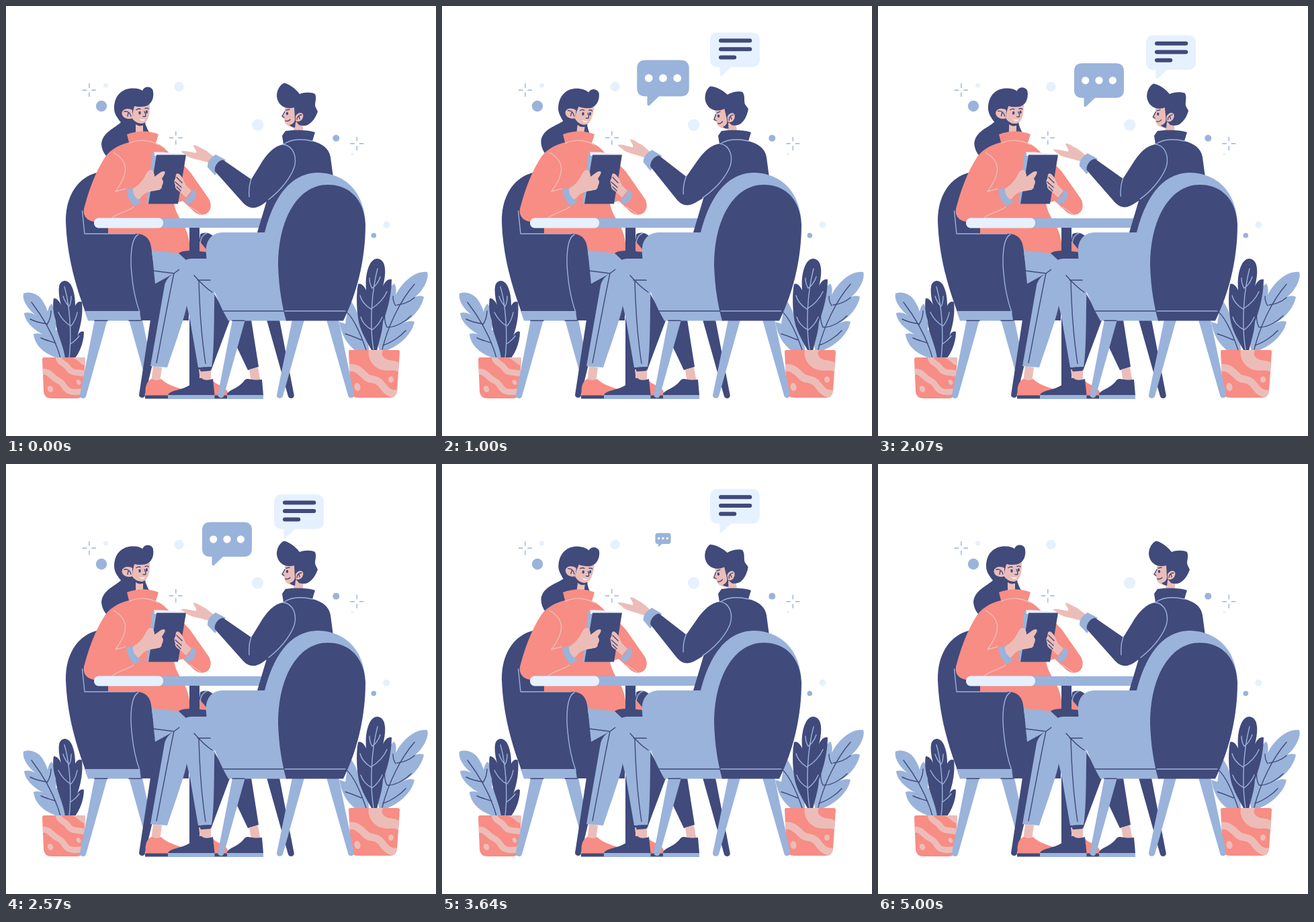
Animation, 640 px wide and 640 px high, one loop 5070 ms. Source, as an HTML page:

```html
<!DOCTYPE html>
<html lang="en">
<head>
<meta charset="utf-8">
<title>Table talk</title>
<style>
html, body { margin: 0; width: 100%; height: 100%; overflow: hidden; background: #fff; }
svg { display: block; width: 100vw; height: 100vh; }
.n { fill: #404a7b; }
.b { fill: #9ab3db; }
.l { fill: #e6f1ff; }
.c { fill: #f78d85; }
.s { fill: #ecbdb8; }
.w { fill: #fff; }
.ln, .lb, .ls { fill: none; stroke-width: 1.4; stroke-linecap: round; stroke-linejoin: round; }
.ln { stroke: #404a7b; }
.lb { stroke: #9ab3db; }
.ls { stroke: #ecbdb8; }
</style>
</head>
<body>
<svg viewBox="0 0 640 640">
<defs>
  <clipPath id="potL"><path d="M57 523H116Q118 523 118 526L114 577Q113 584 106 584H68Q57 584 56 574L54 526Q54 523 57 523Z"/></clipPath>
  <clipPath id="potR"><path d="M512 512H583Q586 512 586 515L582 573Q581 583 571 583H524Q514 583 513 574L510 515Q510 512 512 512Z"/></clipPath>
  <path id="spark" class="lb" d="M-9.500 0H-4M4 0H9.500M0 -9.500V-4M0 4V9.500"/>
  <path id="bubble" d="M-25 -32.500H25Q37 -32.500 37 -20.500V7Q37 19 25 19H-6L-19 31.500Q-22 33.500 -22.500 30V19H-25Q-37 19 -37 7V-20.500Q-37 -32.500 -25 -32.500Z"/>
</defs>

<!-- floating dots -->
<g class="b"><circle cx="142" cy="149" r="8.200"/><circle cx="491.300" cy="196.700" r="5"/><circle cx="547.300" cy="341.500" r="3.800"/></g>
<g class="l"><circle cx="148.500" cy="118" r="3.600"/><circle cx="257.500" cy="120" r="7.200"/><circle cx="374.500" cy="177" r="8.700"/><circle cx="566.300" cy="325.600" r="5"/><circle cx="515.300" cy="220.500" r="2"/></g>
<use href="#spark" x="123.800" y="125.300"/><use href="#spark" x="252.800" y="196.300"/><use href="#spark" x="522.300" y="204.700"/>

<!-- left plant -->
<path class="b" d="M80 525C54 518 42 502 41 488C47 486 54 488 59 491C42 483 28 470 27 457C33 455 40 457 45 461C31 450 24 437 26 428C34 424 48 428 54 438C57 443 60 448 62 455C63 449 65 445 68 443C74 452 76 466 74 483C77 480 80 480 82 481C90 492 90 510 88 525Z"/>
<path class="ln" d="M38 441C54 462 72 490 81 524M61 474C65 468 67 461 67 454M36 466C44 470 53 472 60 473M52 494C60 498 68 499 74 502"/>
<path class="n" d="M88 525C86 505 74 485 74 468C69 455 70 440 71 435C76 435 80 440 82 445C79 435 78 424 79 418C80 409 89 405 96 414C102 424 103 436 103 446C106 440 110 439 113 441C115 458 111 478 106 491C109 485 113 483 116 485C116 500 110 515 102 525Z"/>
<path class="lb" d="M87 418C95 445 98 490 94 524M93 446C90 443 87 438 85 432M94 447C97 442 97 437 97 432M96 476C89 472 82 464 78 456M97 476C102 470 105 462 106 456M96 503C101 500 106 495 109 491"/>
<g clip-path="url(#potL)">
  <rect class="c" x="50" y="520" width="72" height="66"/>
  <path class="ls" style="stroke-width:9" d="M52 545C64 541 68 553 77 557C88 562 86 570 94 573C102 577 110 572 120 575M78 520C78 532 86 530 92 538C98 548 106 544 120 548"/>
  <ellipse class="s" cx="66" cy="570" rx="4" ry="5" transform="rotate(-25 66 570)"/><ellipse class="s" cx="108" cy="560" rx="3" ry="4" transform="rotate(-30 108 560)"/>
  <path class="s" d="M96 522H120V535C112 536 108 526 96 522Z"/>
</g>

<!-- right plant -->
<path class="b" d="M511 436C520 447 525 460 527 475C537 486 540 500 540 513H520C506 502 499 488 496 470L505 473Z"/>
<path class="ln" d="M506 455C516 462 528 488 536 512M505 488C515 491 522 494 529 497"/>
<path class="b" d="M556 514C552 500 551 485 553 475C552 460 557 445 564 434C566 425 572 417 578 413C581 418 581 424 580 430C590 410 610 393 627 396C630 404 623 422 609 433C614 431 619 431 622 433C618 452 602 467 589 473C597 469 603 468 608 470C604 490 583 508 562 514Z"/>
<path class="ln" d="M608 414C587 438 569 475 560 511M580 446C577 442 576 437 576 432M582 445C592 444 602 439 608 434M567 478C564 472 563 463 564 456M568 478C580 479 596 468 603 461M561 505C574 501 588 491 595 483"/>
<path class="n" d="M545 514C537 499 526 482 524 464C521 445 522 424 524 414C529 412 533 417 536 423C534 400 540 376 553 376C568 378 565 402 561 417C565 408 570 406 574 407C574 430 567 455 561 470C560 488 554 502 552 514Z"/>
<path class="lb" d="M553 391C544 425 541 475 547 511M545 420C542 415 541 410 541 405M545 420C551 416 555 409 557 403M543 451C535 446 529 439 527 431M543 451C555 444 563 434 567 425M545 482C536 478 530 470 528 463M545 482C552 477 557 470 560 463"/>
<g clip-path="url(#potR)">
  <rect class="c" x="506" y="508" width="84" height="80"/>
  <path class="ls" style="stroke-width:11" d="M506 541C518 533 528 544 536 552C543 558 549 553 557 561C564 569 568 579 584 577"/>
  <path class="s" d="M540 511H562C556 519 562 525 570 527C577 528 581 528 588 533V546C578 540 571 544 562 542C549 540 537 527 540 511Z"/>
  <ellipse class="s" cx="523" cy="567" rx="4.500" ry="6" transform="rotate(-15 523 567)"/><ellipse class="s" cx="573" cy="556" rx="4" ry="4.500"/>
</g>

<!-- left chair, rear part -->
<path class="b" d="M132 467H151L119 581A4.700 4.700 0 0 1 110 578.500ZM183 467H203L213 515L205 546Z"/>
<path class="n" d="M215 467H234L206.500 581A4.700 4.700 0 0 1 198 579Z"/>
<path class="n" d="M146 246C108 250 88 282 89 322C91 372 103 415 118 455H200L220 330Z"/>

<!-- woman head -->
<g id="woman">
  <path class="n" d="M163 140C160 158 166 168 171 173C162 182 143 188 142 206C143 218 150 226 160 232L200 228L218 195C211 186 208 178 205 168Z"/>
  <path class="s" d="M193 170H204V194H193Z"/>
  <path class="n" d="M190 169C195 175 203 176 208 173C206 179 198 180 193 176Z"/>
  <path class="s" d="M184 146H214C214 158 213 172 204 174.500C196 176 190 171 187 166Z"/>
  <path class="n" d="M161 152C161 132 174 122 190 122.500C196 122.600 200 124 203 126C206 119 215 119 218.500 125C221.500 137 216 148 206 149.500C200 150.300 195 150 191 149C190 154 188 158 188 167L172 172C165 167 161 160 161 152Z"/>
  <path class="s" d="M188 155C184 152 174 152 172.500 159C172 166 181 170 188 167Z"/>
  <path class="ln" d="M176 157C181 156 185 159 186 164M182 159L181 164M194 154.500Q197 152 200 153.500M207 152.500Q210 151 212 153M206 157Q209 163 207.500 164.500L204 164.500"/>
  <ellipse class="n" cx="199" cy="159" rx="1.700" ry="2.500"/><ellipse class="n" cx="209.300" cy="157.500" rx="1.600" ry="2.500"/>
  <path class="w" d="M198.500 168.300Q203 170 207 168.200Q205.500 171.200 202.500 170.800Q200 170.300 198.500 168.300Z"/>
</g>

<!-- woman torso -->
<path class="c" d="M180 191C196 185 213 185 227 191L223 204C229 206 236 211 242 218C260 232 268 240 274 247L302 287C307 296 305 307 296 310C290 312 285 310 280 306L263 290L250 294C252 304 256 312 261 320C268 332 274 343 274 368H215L200 345H152V319C146 321 138 321 131 321C118 319 113 309 117 298C125 268 135 245 145 229C152 216 166 207 183 203Z"/>
<path class="ls" d="M184 204C198 198 214 199 227 207M160 218C184 232 182 250 163 276L178 272M158 315C169 307 183 305 190 299M274 299C279 302 285 306 290 310"/>

<!-- notebook and hands -->
<path class="b" d="M218 219L225 220L215 294H209Z"/>
<path class="w" d="M221 217.500L268 220V223H221Z"/>
<path class="l" d="M220 217.500H234L268 221H221Z"/>
<path class="n" d="M224 221.500H268L256 294.500H212Z"/>
<path class="s" d="M187 273C200 266 205 257 208 251C211 244 217 242 219 246C221 250 221 251 221 254C226 251 230 246 235 246C239 247 235 252 232 257L234 261C234 264 233 266 232 268C232 272 229 274 226 274C219 276 207 275 200 286L194 290Z"/>
<path class="b" d="M179 273L189 271C188 281 194 288 203 291L191 298C184 292 180 282 179 273Z"/>
<path class="s" d="M253 251C255 247 259 250 262 255C265 260 266 264 268 267L276 275L268 285L258 276C253 273 251 270 252 267C250 263 250 259 252 257Z"/>
<path class="ln" d="M254 255L262 263M252 262L261 270M254 269L260 275"/>
<path class="b" d="M276 272L283 278C283 287 277 294 269 295L266 288C272 285 276 280 276 272Z"/>

<!-- left chair, front part -->
<path class="n" d="M113 304L117 339H195C211 340 216 350 217 366L224 410H272V468H201L118 455L100 390Z"/>
<path class="b" d="M117 454H199L201 468.500H122Z"/>
<path class="lb" d="M113.500 305L117 339H192M197 340C185 346 185 378 187 398C189 421 194 442 199 456"/>
<path class="ln" d="M132 468.300H151M183 468.300H201"/>

<!-- table -->
<path class="n" d="M273 328H288V584H273Z"/>
<path class="c" d="M288 346H300V370H288Z"/>
<path class="n" d="M289 340C296 335 306 338 311 346L298 362L288 350Z"/>
<path class="lb" d="M289 353C290 345 293 340 299 338"/>
<path class="b" d="M225 316H384V330H225Z"/>
<rect class="l" x="131" y="315.500" width="103" height="15" rx="7"/>

<!-- woman legs -->
<path class="b" d="M217 363C235 367 255 366 277 371L262 392L254 402L222 414Z"/>
<path class="ln" d="M219 394L250 398"/>
<path class="n" d="M257 368C266 361 288 366 301 366V380H270Z"/>
<path class="n" d="M221 414L250 398L237 421L222 440Z"/>
<path class="s" d="M219 536L232 538L229 560H216Z"/>
<path class="c" d="M208 580C206 567 210 557 217 555C222 558 228 557 231 555C239 564 256 568 263 571L250 580ZM308 558C313 564 328 566 330 575V580H308Z"/>
<path class="n" d="M207 579.500H244V584.500H207ZM288 579.500H330V584.500H288Z"/>
<path class="b" d="M236 416C238 405 248 398 259 392L269 445C267 462 249 510 240 538L215 536Z"/>
<path class="ln" d="M250 398C244 425 231 495 224 531M250 398L258 392"/>

<!-- man legs -->
<path class="n" d="M308 425L333 468L305 543H290Z"/>
<path class="n" d="M350 467H365L376 537L360 542L341 502Z"/>
<path class="s" d="M362 541L375 538L379 560H365ZM287 541H305V558H289Z"/>
<path class="b" d="M302 376H275C262 377 257 386 258 399C260 420 270 445 274 468L286 538L306 537C311 505 309 450 311 410L318 400Z"/>
<path class="n" d="M287 538L307 537L304 543L290 544Z"/>
<path class="ln" d="M280 401C287 409 296 419 307 426M285 408H308M287 409C288 450 292 500 297 532"/>
<path class="n" d="M241 579C243 572 262 572 274 564C282 556 287 553 291 554C296 558 302 557 308 555L310.500 579ZM329 579C329 571 345 571 355 557C361 552 362 558 381 556L383 579Z"/>
<path class="b" d="M241 579H310.500V585H241ZM329 579H383V585H329Z"/>

<!-- man -->
<g id="man">
  <path class="s" d="M429 172H442V196H427Z"/>
  <path class="s" d="M415 148H440V174L431 181C424 181 417 178 415 173L414 168L410 165Q412 162 415 157Z"/>
  <path class="n" d="M414 114.500C423 117 431 123 437 131C444 128 455 128 460 131C463 138 459 144 460.500 150L464 157C461 166 456 173 449 177C444 179 439 178 436 177L432 172C430 174 431 178 430 181C427 181 424 179 422 177C427 176 430 173 430 168L429 151C415 155 404 147 403 134C403 125 408 117 414 114.500Z"/>
  <path class="s" d="M431 164C434 158 442 157 442.500 163C442 170 436 174 431 171Z"/>
  <path class="ln" d="M440 162C436 162 433 165 433 169M436 164L437 168M417 155L422 154M415 157L411 164L414 166M416 171C419 172 421 171 423 169"/>
  <ellipse class="n" cx="418.500" cy="160" rx="1.700" ry="2.300"/>
</g>
<path class="n" d="M416 186C430 184 449 184 460 188L456 201C472 205 481 213 483 225L487 255L410 337H374L388 290L413 206L411 193Z"/>
<path class="lb" d="M413 206C424 198 439 197 456 201"/>
<g id="arm">
  <path class="s" d="M308 235L298 232C285 228 272 227 268 222L260 216.500C266 214 275 218 283 218.500C285 215 278 210 279 207C284 206 290 212 294 213C300 216 305 221 310 225Z"/>
  <path class="b" d="M312 221L327 229L311 252L300 240C299 232 305 225 312 221Z"/>
  <path class="n" d="M413 206C399 208 388 220 378 237L365 258L323 229C316 229 309 240 311 246L352 292C362 303 372 303 385 293C402 283 422 259 429 240C433 225 429 208 413 206Z"/>
  <path class="lb" d="M412 206C429 208 433 226 429 240C423 257 408 275 391 288M365 257C362 266 361 275 362 284"/>
</g>

<!-- right chair -->
<path class="n" d="M388 467H407L428.500 578A4.500 4.500 0 0 1 420 581Z"/>
<path class="b" d="M337 467H356L324 581A4.700 4.700 0 0 1 315.300 578.500ZM426 467H444L412 581A4.700 4.700 0 0 1 403 579ZM477 467H495L518 578A4.600 4.600 0 0 1 509.500 581Z"/>
<path class="b" d="M323 454C311 428 299 401 298 370C296 350 305 337 324 337H385C397 290 420 249 464 248C505 249 531 276 534.500 318L420 468.500H331Z"/>
<path class="n" d="M479 266C434 266 405 318 405 385C406 420 411 447 417 468.500H502C521 430 535 380 535 325C533 288 511 266 479 266Z"/>
<path class="ln" d="M323 454H414M337 468.300H355"/>
<path class="lb" d="M415 454H505"/>

<!-- speech bubbles, drawn around their own centres -->
<g id="dark">
  <use href="#bubble" class="b"/>
  <g class="w"><circle cx="-20.300" cy="-7" r="5.600"/><circle cy="-7" r="5.600"/><circle cx="20.300" cy="-7" r="5.600"/></g>
</g>
<g id="light">
  <use href="#bubble" class="l"/>
  <path class="ln" style="stroke-width:6" d="M-21 -20.300H22.300M-21 -7.700H22.300M-21 4.700H-.800"/>
</g>
</svg>
<script>
const LOOP = 5070, STEP = LOOP / 71, POP = 605;
const set = (id, v) => document.getElementById(id).setAttribute("transform", v);

// smooth swing through [time, value] stops
function swing(t, stops) {
  for (let i = 1; i < stops.length; i++) {
    const [t0, a] = stops[i - 1], [t1, b] = stops[i];
    if (t <= t1) return a + (b - a) * (1 - Math.cos(Math.PI * (t - t0) / (t1 - t0))) / 2;
  }
  return stops[stops.length - 1][1];
}

function backOut(p) {
  const s = 2.45, u = Math.min(1, Math.max(0, p)) - 1;
  return 1 + (s + 1) * u ** 3 + s * u * u;
}

// scale of a bubble that pops in at one time and is gone by another
const pop = (t, start, end) => backOut(Math.min(t - start, end - t) / POP);

const NOD = [[0, 0], [1130, 1], [2520, 0], [3700, 1], [5000, 0]];
const BOB = [[0, 77.8], [1250, 71.3], [2500, 77.8], [3750, 69.5], [5000, 77.8]];

function draw(t) {
  const k = swing(t, NOD), y = swing(t, BOB);
  set("woman", `rotate(${7.6 * k} 192 245)`);
  set("man", `rotate(${-10 * k} 437 203)`);
  set("arm", `rotate(${3.2 * k} 437 230)`);
  set("light", `translate(436 ${y}) scale(${pop(t, 65, 4570)})`);
  set("dark", `translate(329 ${60 + y * 0.76}) scale(${pop(t, 490, 3680)})`);
}

const begin = performance.now();
function tick() {
  const t = (performance.now() - begin) % LOOP;
  draw(Math.floor((t + 4) / STEP) % 71 * STEP);
  requestAnimationFrame(tick);
}
draw(0);
requestAnimationFrame(tick);
</script>
</body>
</html>
```
